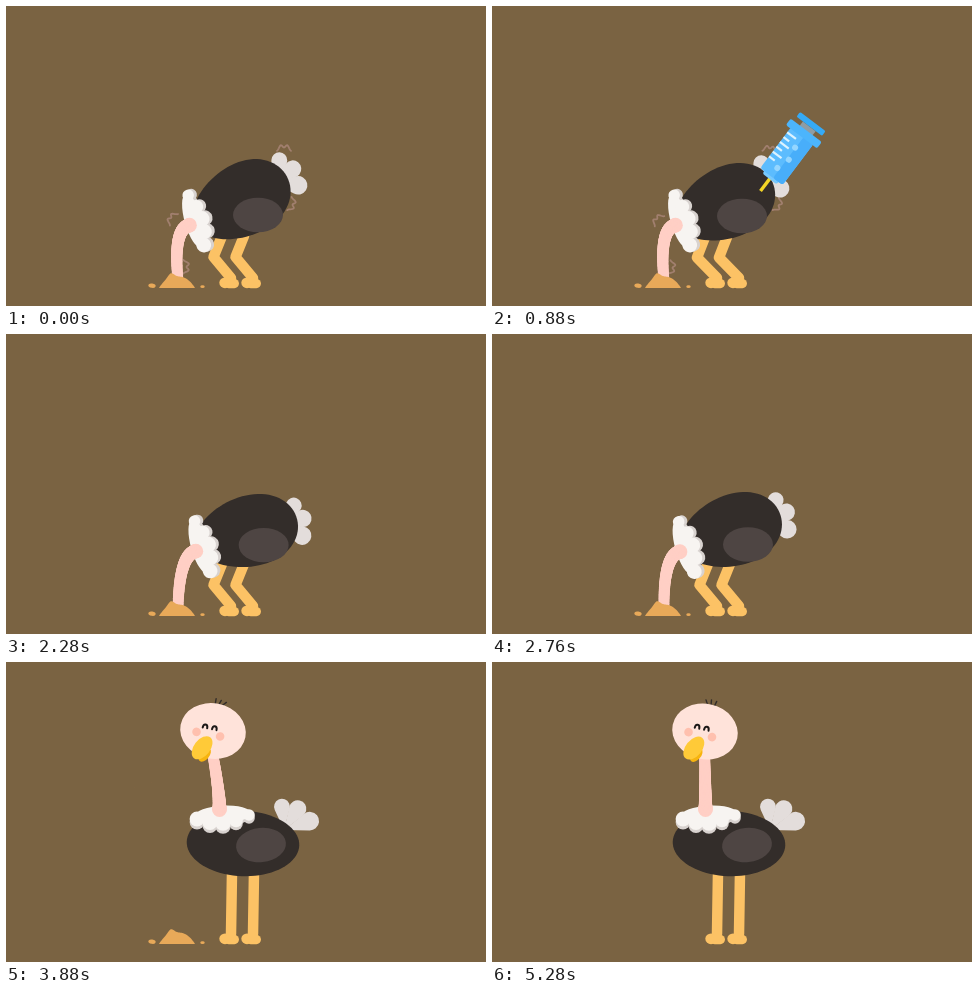
An HTML page with a canvas that plays this animation: 480x300 px, repeating every 5.32 s.

```html
<!DOCTYPE html>
<html>
<head>
<meta charset="utf-8">
<style>
html, body { margin: 0; width: 100%; height: 100%; overflow: hidden; background: #7a6342; }
canvas { display: block; width: 480px; height: 300px; }
</style>
</head>
<body>
<canvas id="stage" width="480" height="300"></canvas>
<script>
const ctx = document.getElementById('stage').getContext('2d');
const LOOP = 5320, STEP = 40, RAD = Math.PI / 180, TAU = Math.PI * 2;
const BG = '#7a6342', LEG = '#fcc265', SAND = '#e8a959', DARK = '#332d2a', PINK = '#ffcfc5';

// ---- helpers ----
const clamp = v => Math.max(0, Math.min(1, v));
const lerp = (a, b, k) => a + (b - a) * k;
const part = (t, a, b) => clamp((t - a) / (b - a));
const ramp = (t, a, b) => { const k = part(t, a, b); return k * k * (3 - 2 * k); };

function mix(p, q, k) {
  const out = {};
  for (const key in p) out[key] = p[key].map((v, i) => lerp(v, q[key][i], k));
  return out;
}

// Point (dx, dy) of a frame placed at (x, y) and turned by rot degrees
function local([x, y, rot], dx, dy) {
  const c = Math.cos(rot * RAD), s = Math.sin(rot * RAD);
  return [x + dx * c - dy * s, y + dx * s + dy * c];
}

function placed([x, y, rot], draw) {
  ctx.save();
  ctx.translate(x, y);
  ctx.rotate(rot * RAD);
  draw();
  ctx.restore();
}

function oval(x, y, rx, ry, rot, color) {
  ctx.fillStyle = color;
  ctx.beginPath();
  ctx.ellipse(x, y, rx, ry, rot * RAD, 0, TAU);
  ctx.fill();
}

function box(x, y, w, h, r, color) {
  ctx.fillStyle = color;
  ctx.beginPath();
  ctx.roundRect(x, y, w, h, r);
  ctx.fill();
}

// Path through n + 1 points of a function over 0..1
function curve(n, point) {
  ctx.beginPath();
  for (let i = 0; i <= n; i++) ctx.lineTo(...point(i / n));
}

function pen(width, color) {
  ctx.lineWidth = width;
  ctx.strokeStyle = color;
  ctx.lineCap = ctx.lineJoin = 'round';
}

// ---- poses ----
// body: x, y, rot, half length, half height, egg   spot: dx, dy, rot
// collar, tail, head: x, y, rot   legs: hip x, hip y, knee bend, step
const buried = {
  body: [235, 195, -28, 52, 36, 0.12], spot: [17, 14, 0],
  collar: [188.5, 214.5, -103], tail: [265, 176, -31],
  legs: [216, 230, 13, 0], head: [167, 249, 0], hair: [-4.5]
};
const pressed = {
  ...buried, body: [233, 197.5, -24, 52, 35.5, 0.12], spot: [17, 12.5, 0],
  tail: [261, 179, -31], legs: [213, 231, 14, 0]
};
const tug = {
  ...buried, body: [239, 197, -18, 52, 35.5, 0.12], spot: [17, 13.5, 0],
  collar: [193, 213, -103], tail: [270, 185, -16]
};
const recoil = {
  body: [254, 184.5, 8, 56, 32, 0], spot: [16, 6, 0],
  collar: [236, 154.5, 0], tail: [299, 185, -16],
  legs: [234, 212, 4, -7], head: [222, 70, 0], hair: [-4.5]
};
const rest = {
  body: [237, 181.5, 2, 56.3, 32.7, 0], spot: [18, 1.5, -6],
  collar: [217, 153.5, 0], tail: [278, 168, -57],
  legs: [226, 210, 0, 0], head: [213, 69.5, 12], hair: [-0.7]
};
const lean = { ...rest, head: [207, 69, 11], hair: [1.8] };

function poseAt(t) {
  if (t < 1840) return mix(buried, pressed, ramp(t, 640, 800) - ramp(t, 1120, 1360));
  const wiggle = 1.6 + 0.6 * Math.cos(TAU * (Math.min(t, 2960) - 2160) / 400);
  const tugging = mix(buried, tug, ramp(t, 1840, 2160) * wiggle);
  if (t < 2960) return tugging;
  if (t < 3400) {
    const pose = mix(tugging, recoil, ramp(t, 2960, 3400)), pop = part(t, 3280, 3400);
    pose.head = buried.head.map((v, i) => lerp(v, recoil.head[i], pop));
    pose.head[0] -= 20 * Math.sin(Math.PI * pop);
    return pose;
  }
  if (t < 3880) {
    const u = part(t, 3400, 3880);
    return mix(recoil, lean, 1 - Math.exp(-3 * u) * Math.cos(2.5 * Math.PI * u));
  }
  return mix(lean, rest, 0.5 - 0.5 * Math.cos(3 * Math.PI * (t - 3880) / 1400));
}

// ---- bird ----
function drawTail([x, y, rot]) {
  for (const i of [-1, 0, 1]) {
    const d = 25.3 + 2 * i, r = d * 0.34, half = Math.acos(0.34);
    placed([x, y, rot + 38 * i], () => {
      ctx.fillStyle = '#e3dddb';
      ctx.beginPath();
      ctx.moveTo(0, 0);
      ctx.arc(d, 0, r, Math.PI + half, Math.PI - half);
      ctx.fill();
    });
  }
}

function drawLeg(hip, y, ankle, bend) {
  pen(10.5, LEG);
  ctx.beginPath();
  ctx.moveTo(hip, y);
  ctx.lineTo((hip + ankle) / 2 - bend, (y + 272) / 2);
  ctx.lineTo(ankle, 272);
  ctx.stroke();
  oval(ankle - 6, 276.8, 5.7, 5.4, 0, LEG);
  box(ankle - 7, 273, 15, 9.2, 4.6, LEG);
}

function drawBody([x, y, rot, a, b, egg]) {
  placed([x, y, rot], () => {
    ctx.fillStyle = DARK;
    curve(80, k => {
      const c = Math.cos(k * TAU);
      return [a * c, b * Math.sin(k * TAU) * (1 + egg * c)];
    });
    ctx.fill();
  });
}

function drawCollar(frame) {
  placed(frame, () => {
    for (const [dy, color] of [[3, '#d8d2cf'], [0, '#f7f4f1']]) {
      oval(0, dy - 1, 28, 8.8, -3, color);
      for (let i = -2; i <= 2; i++) {
        const r = 7.8 - 0.6 * Math.abs(i) - 0.4 * i;
        oval(13 * i, 7.5 - 1.5 * i * i - i + dy, r, r, 0, color);
      }
    }
  });
}

function drawNeck(collar, head) {
  const a = local(collar, -3.5, -6), b = local(collar, -3.5, -23), c = local(head, 5, 25);
  for (let k = 0; k <= 1; k += 1 / 64) {
    const [x, y] = [0, 1].map(i => lerp(lerp(a[i], b[i], k), lerp(b[i], c[i], k), k));
    const r = lerp(7.4, 5.4, Math.sqrt(k));
    oval(x, y, r, r, 0, PINK);
  }
}

function drawHead(frame, hair) {
  placed(frame, () => {
    pen(1.4, DARK);
    for (const i of [-1, 0, 1]) {
      const dx = hair + i * 2, x = i * 3.4 + 0.5;
      ctx.beginPath();
      ctx.moveTo(x, -26.5);
      ctx.lineTo(x + dx, -32.5 + Math.abs(dx) / 2);
      ctx.stroke();
    }
    oval(0, 0, 33, 27.7, 0, '#ffe3da');
    for (const x of [-16, 8]) oval(x, 4, 4.3, 4.3, 0, '#ffc0ae');
    pen(2, '#1c1817');
    for (const x of [-8.5, 1]) {
      ctx.beginPath();
      ctx.ellipse(x, -1.5, 2.3, 3.5, 0, Math.PI, TAU);
      ctx.stroke();
    }
    oval(-3.5, 25, 8, 4.5, -62, '#f7b40f');
    oval(-7.5, 18.5, 13.2, 8.2, -63, '#ffca38');
  });
}

function drawBird(p, t) {
  const [hip, y, bend, step] = p.legs, [bx, by] = p.body, [dx, dy, rot] = p.spot;
  drawTail(p.tail);
  drawLeg(hip + 22, y, 247, bend);
  drawLeg(hip, y, 225 + step, bend);
  drawBody(p.body);
  oval(bx + dx, by + dy, 25, 17.2, rot, '#4e4543');
  drawCollar(p.collar);
  drawNeck(p.collar, p.head);
  if (t > 3300) drawHead(p.head, p.hair[0]);
}

// ---- surroundings ----
function drawMound(t) {
  const side = 1 - ramp(t, 4080, 4440), main = 1 - ramp(t, 4400, 5000);
  oval(146, 279.7, 3.7 * side, 2.2 * side, 10, SAND);
  oval(196.5, 280.7, 2.2 * side, 1.4 * side, 0, SAND);
  ctx.fillStyle = SAND;
  curve(40, k => {
    const x = 36 * k - 18;
    const h = 11.5 * (1 - Math.abs(x / 18) ** 2.5) + 4 * Math.exp(-(((x + 6) / 4) ** 2));
    return [171 + main * x, 282 - main * h];
  });
  ctx.fill();
}

function drawGrains(t) {
  const dig = part(t, 3120, 3390), shake = part(t, 3420, 3900);
  for (let i = 0; i < 8 && dig > 0 && dig < 1; i++) {
    const r = (1.5 + i % 3) * (1 - dig * 0.6), rise = 30 + (i * 37) % 50;
    oval(172 + (i * 14 - 64) * dig, 266 - rise * 4 * dig * (1 - dig) + 10 * dig, r, r, 0, SAND);
  }
  for (let i = 0; i < 4 && shake > 0; i++) {
    const r = 2.4 * (1 - shake);
    oval(186 - (6 + i * 18) * shake, 88 + i * 5 + 24 * shake * shake, r, r, 0, '#c98a5a');
  }
}

function drawMarks(t) {
  const wobble = (1 - Math.cos(TAU * t / 160)) / 2;
  ctx.globalAlpha = 1 - ramp(t, 1500, 1720);
  pen(1.8, '#a17f6e');
  for (const [x, y, rot] of [[278, 140, 0], [164, 211, -55], [288, 199, 108], [182, 261, 92]]) {
    placed([x, y + wobble, rot + 8 * wobble], () => {
      curve(24, k => {
        const u = 14 * k - 7;
        return [u, 0.07 * u * u - 1.5 * Math.cos(u * 0.95 + Math.PI)];
      });
      ctx.stroke();
    });
  }
  ctx.globalAlpha = 1;
}

function drawSyringe(t) {
  const far = 1 - ramp(t, 200, 600), near = 1 - ramp(t, 560, 780);
  const pull = 14 * (1 - ramp(t, 760, 880)) - 4 * ramp(t, 880, 1120);
  ctx.globalAlpha = ramp(t, 200, 360) - ramp(t, 1380, 1640);
  placed([268.5 + 29 * near + 30 * far, 185 - 35 * near - 16 * far, 37], () => {
    box(-1.7, -18, 3.4, 18, 0, '#f3d526');
    box(-8, -81 - pull, 16, 15 + pull, 0, '#8f9ca3');
    box(-16, -87 - pull, 32, 6, 1.5, '#35aaf6');
    box(-9, -22, 18, 7, 2.5, '#79c9fd');
    box(-14, -70, 28, 52, 3, '#5cbcfe');
    box(2, -70, 12, 52, 3, '#48aefa');
    box(-19.5, -76, 39, 8, 2, '#4cb5fc');
    for (let i = 0; i < 6; i++) box(-14, -64 + i * 6, i % 2 ? 7 : 11, 2.2, 0, '#dcf3ff');
    for (let i = 0; i < 3; i++) oval(1.5 + 2.5 * Math.sin(i * 2), -55.5 + i * 13.5, 3, 3, 0, '#95d6ff');
  });
  ctx.globalAlpha = 1;
}

function render(t) {
  ctx.fillStyle = BG;
  ctx.fillRect(0, 0, 480, 300);
  const pose = poseAt(t), tremble = t < 1500 ? 0.8 * Math.sin(TAU * t / 160) : 0;
  pose.body[0] += tremble;
  pose.tail[0] += tremble;
  drawMarks(t);
  drawBird(pose, t);
  drawMound(t);
  drawGrains(t);
  drawSyringe(t);
}

const start = performance.now();
function tick() {
  const t = (performance.now() - start) % LOOP;
  render(Math.floor(t / STEP) * STEP);
  requestAnimationFrame(tick);
}
tick();
</script>
</body>
</html>
```
